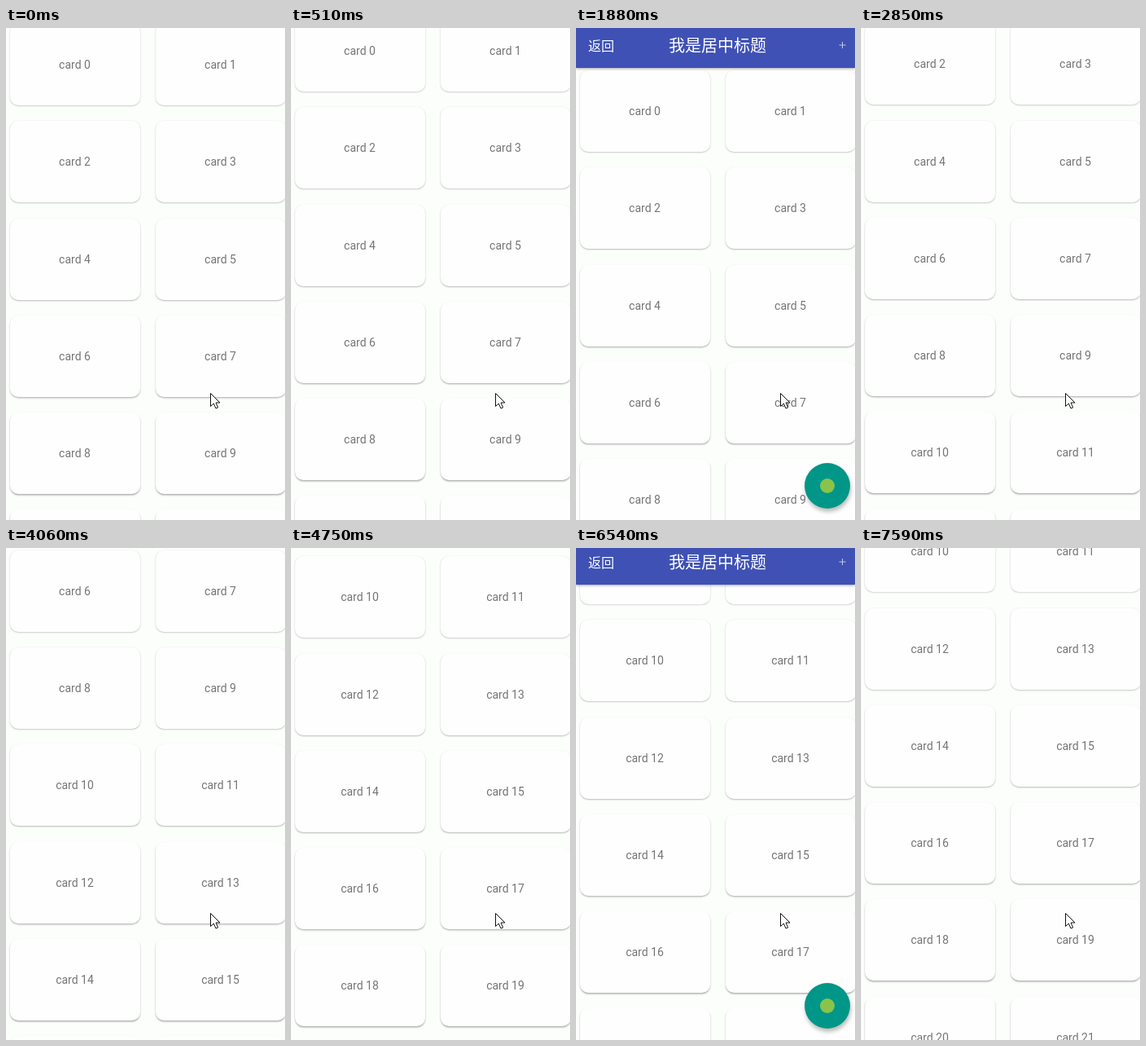
Animation, 343 px wide and 604 px high, one loop 8 s. Source, as an HTML page:

```html
<!DOCTYPE html>
<html lang="zh">
<head>
<meta charset="utf-8">
<title>Card list</title>
<style>
  html, body { margin: 0; width: 100%; height: 100%; overflow: hidden; }
  #stage {
    position: relative; width: 343px; height: 604px; overflow: hidden;
    background: #fcfefc; font-family: Roboto, Arial, sans-serif;
  }
  .card {
    position: absolute; top: 0; width: 160px; height: 100px;
    border-radius: 10px; background: #fdfefd; color: #757575;
    font-size: 14px; line-height: 100px; text-align: center;
  }
  #bar {
    position: absolute; left: 0; top: 0; width: 343px; height: 49px;
    background: #3f51b5; color: #fff; box-shadow: 0 1px 3px rgba(0, 0, 0, .35);
    font-family: "Noto Sans CJK SC", "Noto Sans CJK", sans-serif;
  }
  #bar span { position: absolute; top: 0; line-height: 42px; white-space: nowrap; }
  #back { left: 15px; font-size: 16px; }
  #title { left: 114px; font-size: 20px; }
  #bar svg { position: absolute; left: 323px; top: 16px; }
  #fab {
    position: absolute; left: 281px; top: 534px; width: 56px; height: 56px;
    border-radius: 50%; background: #009688;
    box-shadow: 1px 4px 5px rgba(0, 0, 0, .26);
  }
  #fab i {
    position: absolute; left: 19px; top: 19px; width: 18px; height: 18px;
    border-radius: 50%; background: #8bc34a;
  }
  #cursor { position: absolute; left: 251px; top: 448px; }
</style>
</head>
<body>
<div id="stage">
  <div id="list"></div>
  <div id="bar">
    <span id="back">返回</span>
    <span id="title">我是居中标题</span>
    <svg width="9" height="10"><path d="M4.5 1v8M.5 5h8" stroke="#c3c9e8" fill="none"/></svg>
  </div>
  <div id="fab"><i></i></div>
  <svg id="cursor" width="14" height="21">
    <path d="M.5 .5V16.5L4.3 13L7 19L9.6 17.9L7 12H12Z" fill="#fff" stroke="#111"/>
  </svg>
</div>
<script>
  const LOOP = 8000, PITCH = 119.25, BAR = 49, COUNT = 26;

  // first step ms, last step ms, steps, from y, to y, y at which the bar is fully open
  const drags = [
    [120, 510, 4, 45, 28, 94],
    [660, 1880, 10, 28, 102, 77],
    [2000, 2850, 7, 102, -75, 102],
    [3270, 3660, 4, -75, -290, 102],
    [4060, 4750, 6, -290, -536, 102],
    [5180, 6260, 9, -536, -454, -487],
    [6540, 7590, 9, -454, -592, -454]
  ];
  // show and hide times of the round button
  const shown = [[1300, 2270], [5700, 6900]];

  const $ = id => document.getElementById(id);
  const clamp = (v, lo, hi) => Math.min(hi, Math.max(lo, v));
  const ease = p => {
    const a = p ** 1.7;
    return a / (a + (1 - p) ** 1.7);
  };

  const cards = Array.from({ length: COUNT }, (_, i) => {
    const el = document.createElement("div");
    el.className = "card";
    el.textContent = "card " + i;
    el.style.left = (i % 2 ? 183.5 : 4.5) + "px";
    $("list").append(el);
    return el;
  });

  function scrollAt(t) {
    const drag = drags.filter(d => d[0] <= t).pop();
    if (!drag) return { y: drags[0][3], open: drags[0][5], time: 0 };
    const [start, end, steps, from, to, open] = drag;
    const gap = (end - start) / (steps - 1);
    const k = Math.min(steps - 1, Math.floor((t - start) / gap + 1e-6));
    return { y: from + (to - from) * ease((k + 1) / steps), open, time: start + k * gap };
  }

  function draw(t) {
    const { y, open, time } = scrollAt(t);

    cards.forEach((el, i) => {
      const top = Math.round(y - 50 + Math.floor(i / 2) * PITCH);
      const depth = clamp((top + 100) / 604, 0, 1);
      el.style.transform = `translateY(${top}px)`;
      el.style.boxShadow = `0 ${0.5 + depth}px 2px rgba(0,0,0,${0.22 + 0.1 * depth})`;
    });

    const shift = Math.round(clamp(y - open, -BAR, 0));
    $("bar").style.transform = `translateY(${shift}px)`;
    $("bar").style.visibility = shift > -BAR ? "visible" : "hidden";

    const size = Math.max(...shown.map(([on, off]) =>
      clamp((time - on) / 200, 0, 1) * clamp(1 - (time - off) / 200, 0, 1)));
    $("fab").style.transform = `scale(${size})`;
    $("fab").style.opacity = size;
  }

  const begin = performance.now();
  function tick() {
    draw((performance.now() - begin) % LOOP);
    requestAnimationFrame(tick);
  }
  draw(0);
  requestAnimationFrame(tick);
</script>
</body>
</html>
```
